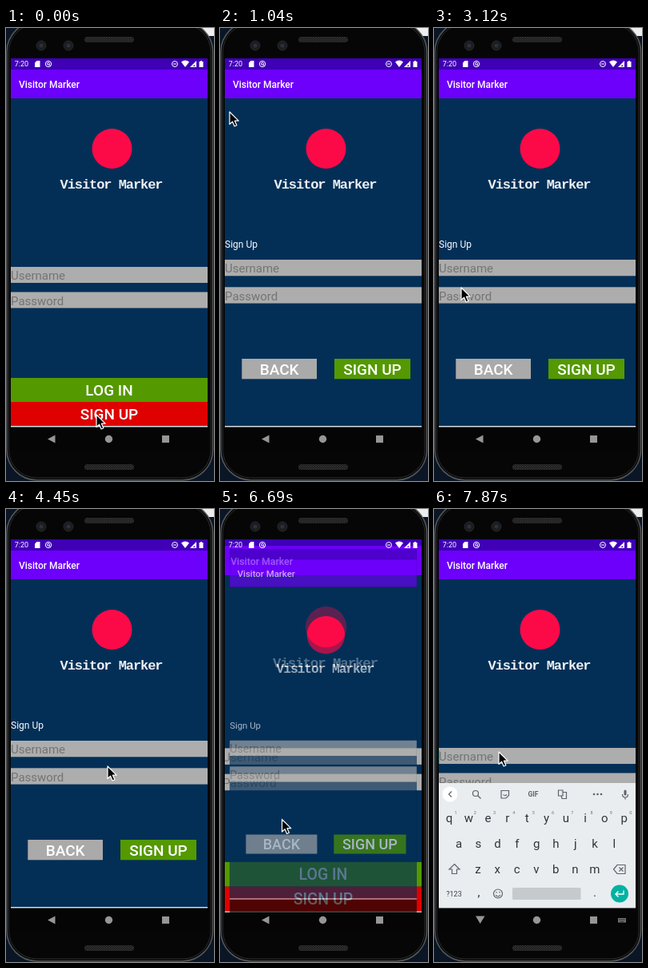
These frames come from a looping animation (260x567 px, 8 s). An HTML page:

```html
<!DOCTYPE html>
<html lang="en">
<head>
<meta charset="utf-8">
<title>Visitor Marker</title>
<style>
  html, body { margin: 0; width: 100%; height: 100%; overflow: hidden; background: #0a1626; }
  svg { display: block; width: 100%; height: 100%; font-family: Roboto, sans-serif; }
  .page { transform-origin: 129px 284px; }
  .button { font-size: 19px; font-weight: 500; fill: #fff; text-anchor: middle; }
  .hint { font-size: 15px; fill: #747474; }
  .pressed .hint:first-of-type { fill: #505050; }
  .brand { font: bold 17px "Liberation Mono", monospace; letter-spacing: -1.06px; fill: #eef0f2; text-anchor: middle; }
  .key { font-size: 15px; fill: #30363b; text-anchor: middle; }
  .small { font-size: 5.5px; fill: #70757a; text-anchor: middle; }
  .line { fill: none; stroke: #5f6368; stroke-width: 1.2; }
</style>
</head>
<body>
<svg viewBox="0 0 260 567" preserveAspectRatio="none">
  <defs>
    <clipPath id="screen"><rect x="6" y="38" width="246" height="492"/></clipPath>
    <clipPath id="inputArea"><rect x="6" y="343" width="246" height="156"/></clipPath>
    <pattern id="mesh" width="3" height="3" patternUnits="userSpaceOnUse">
      <rect width="3" height="3" fill="#1c1c1c"/><path d="M0 0L3 3M3 0L0 3" stroke="#353535" stroke-width=".7"/>
    </pattern>
    <g id="header">
      <rect x="6" y="38" width="246" height="492" fill="#050505"/>
      <rect x="6" y="38" width="246" height="15" fill="#3f00b6"/>
      <rect x="6" y="52" width="246" height="36" fill="#6c00fa"/>
      <rect x="6" y="88" width="246" height="411" fill="#032f57"/>
      <rect x="6" y="498" width="246" height="1.500" fill="#d5dce2"/>
      <text x="16" y="75" font-size="12" font-weight="500" fill="#fff">Visitor Marker</text>
      <circle cx="132.500" cy="151" r="25" fill="#fc0a48"/>
      <text class="brand" x="131.500" y="200.500">Visitor Marker</text>
    </g>
  </defs>

  <!-- phone body -->
  <rect x="230" width="30" height="10" fill="#eee"/>
  <rect x="1" y="-8" width="257.500" height="574" rx="38" fill="#0a0a0a" stroke="#55585a" stroke-width="1.500"/>
  <rect x="3.500" y="-5" width="252.500" height="568" rx="35" fill="#060606" stroke="#2a2b2c"/>
  <rect x="98" y="11" width="62" height="7" rx="3.500" fill="url(#mesh)"/>
  <rect x="98" y="546" width="62" height="7" rx="3.500" fill="url(#mesh)"/>
  <g fill="#1b1d20" stroke="#25282c">
    <circle cx="44" cy="22" r="6"/><circle cx="78" cy="22" r="6"/>
  </g>
  <g fill="#2b313c"><circle cx="44" cy="22" r="2.500"/><circle cx="78" cy="22" r="2.500"/></g>

  <g clip-path="url(#screen)">
    <g id="login" class="page"></g>
    <g id="signup" class="page"></g>
    <rect id="caret" x="6" y="302" width="1.200" height="17" fill="#03c9a9"/>
    <g clip-path="url(#inputArea)"><g id="keyboard"></g></g>

    <!-- status icons -->
    <g fill="#fff">
      <text x="10.700" y="48" font-size="9">7:20</text>
      <path d="M38.500 41H42.500V49H36V43.500Z"/>
      <path d="M219 42.500Q224 38.500 229 42.500L224 49Z"/>
      <path d="M238 41V49H230ZM236 46L233.500 48H236Z" fill-rule="evenodd"/>
      <path d="M241.500 42H243V41H245V42H246.500V49H241.500Z"/>
      <rect x="209" y="44.500" width="4" height="1"/>
      <g fill="none" stroke="#fff">
        <circle cx="53" cy="45" r="3.700"/><circle cx="53" cy="44.700" r="1.500"/><path d="M54 46L56 48"/>
        <circle cx="211" cy="45" r="3.500"/>
      </g>
    </g>

    <!-- navigation -->
    <g fill="#969696">
      <path id="back" d="M52 514.500L61.500 509.500V519.500Z"/>
      <path id="down" d="M52 509.500H63.500L57.700 519Z"/>
      <circle cx="128.500" cy="514.500" r="4.700"/><rect x="195" y="510" width="9" height="9"/>
      <g id="switcher">
        <rect x="230" y="512" width="10" height="5.500" fill="#777"/>
        <path d="M231 513.500H239M231 515H239M233 516.500H237" stroke="#111" stroke-width=".8" stroke-dasharray="1 .7"/>
      </g>
    </g>
  </g>
  <path id="pointer" d="M0 0V15.500L3.600 12.200L6.100 18L8.900 16.800L6.400 11.200H11.200Z" fill="#000" stroke="#fff" stroke-width="1.200" stroke-linejoin="round"/>
</svg>
<script>
const $ = id => document.getElementById(id);
const LOOP = 8000, STEP = 148.48;

const rect = (x, y, w, h, fill) => `<rect x="${x}" y="${y}" width="${w}" height="${h}" fill="${fill}"/>`;
const label = (cls, x, y, text) => `<text class="${cls}" x="${x}" y="${y}">${text}</text>`;
const field = (y, h, text) => rect(6, y, 246, h, '#adadad') + label('hint', 6, y + 16.2, text);
const button = (x, y, w, h, fill, text) =>
  rect(x, y, w, h, fill) + label('button', x + w / 2, y + h / 2 + 7, text);

$('login').innerHTML = '<use href="#header"/>' +
  field(299, 20, 'Username') + field(330.5, 20, 'Password') +
  button(6, 438, 246, 30, '#549900', 'LOG IN') +
  button(6, 468, 246, 30, '#df0000', 'SIGN UP');

$('signup').innerHTML = '<use href="#header"/>' +
  '<text x="6" y="274.700" font-size="12" fill="#fff">Sign Up</text>' +
  field(290, 20.3, 'Username') + field(324.3, 20.3, 'Password') +
  button(27.3, 414, 93.7, 25.3, '#aaa', 'BACK') +
  button(143, 414, 95, 25.3, '#549900', 'SIGN UP');

const keyRow = (letters, x, y) =>
  [...letters].map((c, i) => label('key', x + 24.3 * i, y, c)).join('');

$('keyboard').innerHTML = rect(6, 343, 246, 157, '#e9edf0') +
  keyRow('qwertyuiop', 19, 391.5) + keyRow('asdfghjkl', 31, 423.5) + keyRow('zxcvbnm', 55, 455.5) +
  [...'1234567890'].map((c, i) => label('small', 27 + 24.3 * i, 382, c)).join('') +
  `<circle cx="20" cy="357" r="9.500" fill="#fff"/>
  <g class="line">
    <path d="M22 353.500L18.500 357L22 360.500"/>
    <circle cx="52" cy="356" r="3.500"/><path d="M54.500 358.500L58.500 362.500"/>
    <path d="M84 352.500H93.500V358.500L90 362H84Z M86.500 357.500Q88.500 360 91 357.500"/>
    <path d="M155.500 352H161V359H155.500Z M161 354.500H165.500V362.500H160L159 359"/>
    <path d="M235.500 357Q235.500 361 239 361T242.500 357M239 361V363.500"/>
    <path d="M25.500 444.500L32 451H28.500V456.500H22.500V451H19Z"/>
    <path d="M224.500 451L229 445.500H239V456.500H229ZM231.500 448.500L236.500 453.500M236.500 448.500L231.500 453.500"/>
    <circle cx="80" cy="481.500" r="5.500"/><path d="M77 483Q80 487 83 483M78 479V480.500M82 479V480.500"/>
  </g>
  <rect x="237.500" y="351.500" width="3" height="7" rx="1.500" fill="#5f6368"/>
  <g fill="#5f6368"><circle cx="200" cy="357" r="1.300"/><circle cx="204.500" cy="357" r="1.300"/><circle cx="209" cy="357" r="1.300"/></g>
  <text x="124" y="360" font-size="8.500" font-weight="700" fill="#5f6368" text-anchor="middle">GIF</text>
  <text x="25" y="485" font-size="9" fill="#40464b" text-anchor="middle">?123</text>
  <rect x="98" y="474" width="85.500" height="15" rx="1.500" fill="#c6cacd"/>
  <circle cx="232" cy="481.500" r="11" fill="#00b2a2"/>
  <path d="M237 477.500V482H227.500M230.500 478.500L227 482L230.500 485.500" fill="none" stroke="#fff" stroke-width="1.400"/>` +
  label('key', 56, 485, ',') + label('key', 201, 485, '.');

// Pointer stops: step, x, y
const route = [
  [1, 113, 484], [2, 112, 480], [3, 100, 400], [5, 60, 250], [6, 60, 250], [7, 12, 105], [8, 2, 84],
  [9, 60, 90], [11, 216, 200], [13, 100, 311], [14, 50, 300], [16, 7, 274], [18, 70, 300],
  [20, 30, 320], [21, 34, 325], [22, 110, 345], [23, 121, 351], [24, 121, 351], [25, 100, 320],
  [27, 43, 247], [30, 127, 322], [32, 115, 388], [34, 180, 440], [35, 188, 430], [37, 150, 469],
  [39, 78, 430], [41, 75, 427], [44, 75, 427], [46, 80, 350], [48, 81, 304]
];

function pointerAt(n) {
  const i = route.findIndex(stop => stop[0] >= n);
  if (i < 0) return route.at(-1).slice(1);
  if (i === 0) return route[0].slice(1);
  const [a, ax, ay] = route[i - 1], [b, bx, by] = route[i];
  const k = (n - a) / (b - a);
  return [ax + (bx - ax) * k, ay + (by - ay) * k];
}

// 0 shows the login page, 1 the sign-up page
function pageMix(n) {
  if (n < 3 || n > 47) return 0;
  if (n < 5) return 1 - 0.5 * 0.3 ** (n - 3);
  if (n < 45) return 1;
  return 0.5 * 0.3 ** (n - 45);
}

function draw() {
  const n = Math.floor((performance.now() % LOOP + 11) / STEP);
  const mix = pageMix(n), typing = n >= 52;
  $('login').style.transform = `scale(${1 + 0.05 * mix})`;
  $('login').classList.toggle('pressed', n >= 50 && !typing);
  $('signup').style.transform = `scale(${0.9 + 0.1 * mix})`;
  $('signup').style.opacity = Math.min(1, mix * 1.3);
  const show = (id, on) => $(id).style.display = on ? '' : 'none';
  show('signup', mix > 0);
  show('caret', n >= 50);
  show('keyboard', typing);
  show('down', typing);
  show('switcher', typing);
  show('back', !typing);
  $('keyboard').setAttribute('transform', `translate(0 ${n === 52 ? 60 : 0})`);
  $('pointer').setAttribute('transform', `translate(${pointerAt(n)})`);
  requestAnimationFrame(draw);
}
draw();
</script>
</body>
</html>
```
